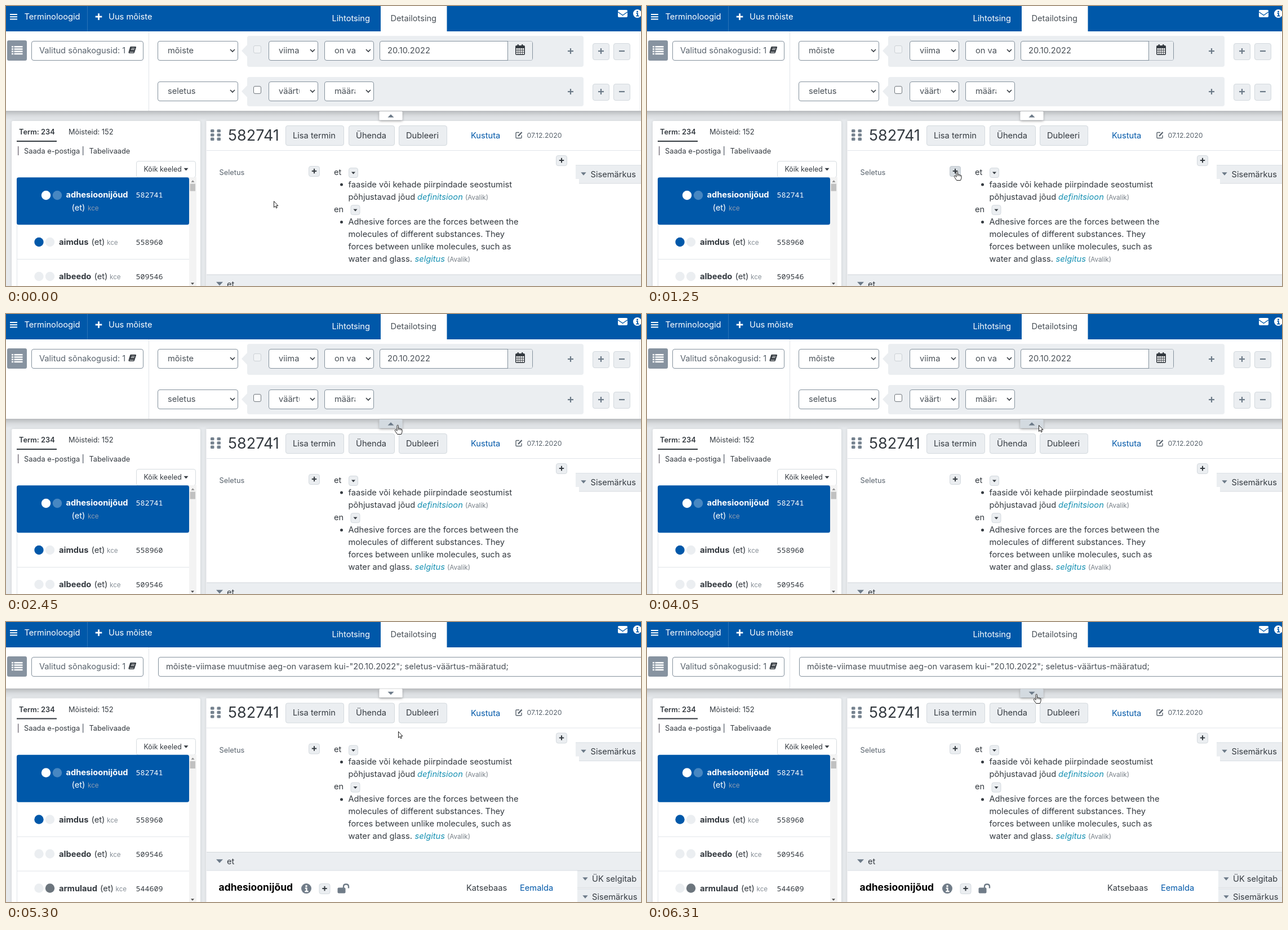
Write an HTML page that moves like this. It is 1127x497 px and loops after 8000 ms.

```html
<!DOCTYPE html>
<html lang="et">
<head>
<meta charset="utf-8">
<title>Detailotsing</title>
<style>
  html, body { margin: 0; width: 100%; height: 100%; overflow: hidden; background: #e6e9ec; }
  svg { display: block; }
  #stage { width: 1127px; height: 497px; }
  text { font-family: Inter, "Open Sans", sans-serif; white-space: pre; }
  text.mono { font-family: "Noto Sans Mono", "DejaVu Sans Mono", monospace; }
</style>
</head>
<body>
<svg id="stage" viewBox="0 0 1127 497">
  <defs>
    <linearGradient id="shade" x2="0" y2="1">
      <stop offset="0" stop-color="#000" stop-opacity=".2"/>
      <stop offset=".5" stop-color="#000" stop-opacity=".06"/>
      <stop offset="1" stop-color="#000" stop-opacity="0"/>
    </linearGradient>
    <filter id="drop" x="-20%" y="-20%" width="140%" height="180%">
      <feDropShadow dx="0" dy="2" stdDeviation="2" flood-opacity=".3"/>
    </filter>
    <filter id="soft" x="-5%" y="-5%" width="110%" height="110%">
      <feDropShadow dx="0" dy="0" stdDeviation="2" flood-opacity=".12"/>
    </filter>
  </defs>
  <g id="page"></g>
  <g id="open"></g>
  <g id="closed"></g>
  <g id="tab"></g>
  <g id="nav"></g>
  <g id="cursor"></g>
</svg>
<script>
const BLUE = '#0058a9', INK = '#343a40', GREY = '#ebeef1', SLATE = '#6c7a88', LINE = '#e1e5e9', ICON = '#707c88';
const LOOP = 8000, LIFT = -68.44;
const $ = id => document.getElementById(id);

const text = (x, y, s, { size = 14.65, fill = INK, weight = 400, style = 'normal', cls = '' } = {}) =>
  `<text x="${x}" y="${y}" class="${cls}" style="font-size:${size}px;fill:${fill};font-weight:${weight};font-style:${style}">${s}</text>`;
const rect = (x, y, w, h, fill, r = 0) =>
  `<rect x="${x}" y="${y}" width="${w}" height="${h}" rx="${r}" fill="${fill}"/>`;
const box = (x, y, w, h, fill = '#fff', stroke = '#84919d', r = 3.5) =>
  `<rect x="${x + .5}" y="${y + .5}" width="${w - 1}" height="${h - 1}" rx="${r}" fill="${fill}" stroke="${stroke}"/>`;
const dot = (x, y, r, fill) => `<circle cx="${x}" cy="${y}" r="${r}" fill="${fill}"/>`;
const line = (d, stroke, w = 1) => `<path d="${d}" fill="none" stroke="${stroke}" stroke-width="${w}"/>`;
const shape = (d, fill) => `<path d="${d}" fill="${fill}"/>`;
const tri = (x, y, w, h, fill = SLATE) => shape(`M${x - w} ${y - h / 2}h${2 * w}l${-w} ${h}z`, fill);
const minus = (x, y, c, r = 5, w = 2.2) => line(`M${x - r} ${y}h${2 * r}`, c, w);
const plus = (x, y, c, r = 5, w = 2.2) => minus(x, y, c, r, w) + line(`M${x} ${y - r}v${2 * r}`, c, w);
const chevron = (x, y) => line(`M${x - 4} ${y - 2}l4 4 4-4`, INK, 1.6);
const button = (x, y, w, h) => box(x, y, w, h, GREY, '#d3d9de');
const info = (x, y, r, fill, ink) => dot(x, y, r, fill) + dot(x, y - r * .48, r * .2, ink) +
  line(`M${x - r * .25} ${y - r * .05}h${r * .3}v${r * .6}m${-r * .35} 0h${r * .7}`, ink, r * .25);
const addButton = (x, y) => button(x, y, 20, 19) + plus(x + 10, y + 9, INK, 4.2, 2);
const dropButton = (x, y) => button(x, y, 17, 18) + tri(x + 8.5, y + 9.5, 3.5, 4, INK);
const select = (x, y, w, label) => box(x, y, w, 35) +
  `<svg x="${x + 18}" y="${y}" width="${w - 51}" height="35">${text(0, 22, label, { fill: '#495057' })}</svg>` +
  chevron(x + w - 10, y + 17);

function searchIcon() {
  let s = rect(2, 61, 35, 36, '#8793a0', 3);
  for (let i = 0; i < 4; i++) {
    const y = 71 + i * 4.2;
    s += rect(10, y, 3, 2.6, '#fff') + rect(14.5, y, 15, 2.6, '#fff');
  }
  return s;
}

function chosenBox(bottom) {
  return rect(0, 44, 1127, bottom - 44, '#fff') + rect(253, 45, 1, bottom - 45, LINE) + searchIcon() +
    box(45, 62, 199, 35) + text(59, 84, 'Valitud sõnakogusid: 1', { fill: '#59636d' }) +
    shape('M221 72h9q1.5 0 1 1.5l-3 9q-.4 1.5-2 1.5h-7q-2 0-1.5-2l2.500-8.500q.3-1.500 1-1.500z', INK) +
    line('M222.500 75h6M221.700 77.500h6M219.500 82h7', '#fff', 1) +
    `<rect y="${bottom}" width="1127" height="17" fill="url(#shade)"/>`;
}

function filterRow(top, y, h, label, a, b, faded) {
  const mid = y + 18;
  return select(269, y, 143, label) + rect(428, top, 597, h, GREY, 4) +
    shape(`M428 ${mid - 11}l-10 10.500 10 10.500z`, GREY) +
    box(439, mid - 10, 14, 14, faded ? '#f1f3f5' : '#fff', faded ? '#cdd2d6' : '#70777d', 2.5) +
    select(466, y, 88, a) + select(565, y, 88, b) + plus(1002, mid, SLATE) +
    button(1041, mid - 14, 30, 30) + plus(1056, mid, SLATE) +
    button(1078, mid - 14, 30, 30) + minus(1093, mid, SLATE);
}

function calendar(x, y) {
  let s = rect(x, y + 2, 17, 17, INK, 2) + rect(x + 3.5, y, 2.5, 5, INK, 1) + rect(x + 11, y, 2.5, 5, INK, 1);
  for (let i = 0; i < 12; i++) s += rect(x + 1.6 + i % 4 * 3.7, y + 7 + (i >> 2) * 3.8, 2.7, 2.8, '#fff');
  return s;
}

function listRow(y, name, after, num, c1, c2) {
  return dot(58.5, y, 8.2, c1) + dot(78, y, 8.2, c2) + text(94, y + 5, name, { weight: 700 }) +
    text(after, y + 5, '(et)') + text(after + 27.5, y + 5, 'kce', { size: 11.7, fill: '#868e96' }) +
    text(230.5, y + 5, num, { cls: 'mono', size: 13.35 }) + rect(19, y + 30, 306, 1, LINE);
}

function leftPanel() {
  const small = { size: 12.8 };
  return `<rect x="10" y="204" width="335" height="500" rx="3" fill="#fff" filter="url(#soft)"/>` +
    text(23, 228, 'Term: 234', { size: 12.8, weight: 600 }) + text(111, 228, 'Mõisteid: 152', small) +
    rect(19, 239, 71, 2, INK) + rect(21, 249, 1.3, 16, '#6b6470') + rect(136, 249, 1.3, 16, '#5c6370') +
    text(32, 261.5, 'Saada e-postiga', small) + text(147.5, 261.5, 'Tabelivaade', small) +
    box(231, 275, 106, 30, '#fff', '#d6dbdf') + text(244.5, 294, 'Kõik keeled', { size: 12.4 }) +
    tri(319.5, 290, 4, 4.5, INK) +
    rect(19, 304, 1, 320, LINE) + rect(325, 304, 13, 320, '#f3f3f3') +
    tri(331.5, 311, 3, -3.5, '#8b8b8b') + rect(326.5, 315.5, 9.5, 13, '#c1c1c1') +
    rect(19, 304.3, 306, 84, BLUE, 3.5) + dot(71, 336, 8.2, '#fff') + dot(91, 336, 8.2, '#4787c2') +
    text(106.5, 340, 'adhesioonijõud', { weight: 700, fill: '#fff' }) + text(116.5, 362.5, '(et)', { fill: '#fff' }) +
    text(145, 362.5, 'kce', { size: 11.7, fill: '#8e9cb0' }) +
    text(230.5, 340, '582741', { cls: 'mono', size: 13.35, fill: '#fff' }) +
    listRow(419, 'aimdus', 151.5, '558960', BLUE, GREY) + listRow(480, 'albeedo', 156.5, '509546', GREY, GREY) +
    listRow(541, 'armulaud', 167, '544609', GREY, '#6c757d');
}

function rightPanel() {
  const tag = { fill: '#1791b3', style: 'italic' }, note = { size: 11.7, fill: '#767e86' }, link = { fill: BLUE };
  let s = `<rect x="355.500" y="204" width="790" height="500" fill="#fff" filter="url(#soft)"/>`;
  for (let i = 0; i < 6; i++) s += rect(363 + i % 2 * 11.5, 219 + (i >> 1) * 7.3, 6.5, 5.3, '#74818e', 1.5);
  s += text(394, 238.5, '582741', { size: 27 });
  for (const [x, w, label] of [[496, 104, 'Lisa termin'], [608, 82, 'Ühenda'], [697, 86, 'Dubleeri']])
    s += button(x, 212, w, 36) + text(x + 13, 234.7, label);
  s += text(825, 235, 'Kustuta', link) +
    line('M911 224.500h-5q-1 0-1 1v8q0 1 1 1h8q1 0 1-1v-4', '#59636d', 1.4) +
    line('M909 231l6.500-7', '#59636d', 2.4) +
    text(924.5, 233.5, '07.12.2020', { size: 12.3, fill: '#59636d' }) + rect(356, 256, 771, 1, LINE) +
    text(378.5, 300, 'Seletus', { size: 12.8, fill: '#59636d' }) + addButton(537, 284) + addButton(976, 265) +
    text(582, 299.7, 'et') + dropButton(608, 287) + text(582, 365.5, 'en') + dropButton(611.5, 353) +
    dot(595.5, 317, 2.5, INK) + dot(595.5, 383.5, 2.5, INK);
  ['faaside või kehade piirpindade seostumist', 'põhjustavad jõud', '', 'Adhesive forces are the forces between the',
    'molecules of different substances. They', 'forces between unlike molecules, such as', 'water and glass.']
    .forEach((t, i) => s += text(607.5, 321.7 + i * 22, t));
  s += text(730, 343.7, 'definitsioon', tag) + text(815, 343.7, '(Avalik)', note) +
    text(725.5, 453.7, 'selgitus', tag) + text(783, 453.7, '(Avalik)', note) +
    rect(1011, 282, 8, 25, GREY) + rect(1017, 282, 110, 33, GREY) + rect(1011, 282, 116, 1, '#dde2e6') +
    rect(1017, 314.5, 110, 1, '#d9dee2') + tri(1025, 298, 4.7, 5.5) + text(1037.5, 303.7, 'Sisemärkus') +
    rect(356, 476.5, 771, 33, GREY) + rect(356, 476.5, 771, 1, '#d3d9dd') + rect(356, 509, 771, 1, '#d9dee2') +
    tri(379, 493, 6, 6.5) + text(392, 498.5, 'et') +
    text(377.5, 545.5, 'adhesioonijõud', { size: 17.5, weight: 700, fill: '#000' }) +
    info(533, 541.5, 9, ICON, '#fff') + addButton(555.5, 532.5) +
    rect(588.5, 540, 14, 10, ICON, 2) + line('M599 541v-3q0-4 4.500-4t4.500 4v3', ICON, 2.4) +
    text(817, 545.5, 'Katsebaas') + text(912, 545.5, 'Eemalda', link);
  [['ÜK selgitab', 509.5], ['Sisemärkus', 541.5]].forEach(([t, y]) =>
    s += rect(1014, y, 113, 31, GREY) + rect(1014, y, 113, 1, '#d6dbe0') + rect(1014, y + 30, 113, 1, '#d6dbe0') +
      tri(1028, y + 15, 4.7, 5.5) + text(1040, y + 20.3, t));
  return s;
}

function build() {
  const white = { fill: '#fff' };
  $('page').innerHTML = rect(0, 0, 1127, 700, '#e6e9ec') +
    `<g id="low">${leftPanel()}${rightPanel()}<g id="addHover">${box(537, 284, 20, 19, '#d5dbe0', '#c3cad1')}${plus(547, 293, INK, 4.2, 2)}</g></g>` +
    rect(325, 486, 13, 11, '#f3f3f3') + tri(331, 493, 3, 3.5, '#505050');
  $('open').innerHTML = chosenBox(186) + rect(1124, 45, 1, 141, '#eef0f2') +
    filterRow(53, 62, 55, 'mõiste', 'viima', 'on va', true) +
    filterRow(126, 134, 52, 'seletus', 'väärtu', 'määra', false) +
    box(663, 62, 272, 35) + shape('M891 62.500h40q3 0 3 3v28q0 3-3 3h-40z', GREY) + rect(890, 62, 1, 35, '#84919d') +
    text(677, 84, '20.10.2022', { fill: '#495057' }) + calendar(904, 68);
  $('closed').innerHTML = chosenBox(118) + box(270, 62, 900, 35) +
    text(284, 84, 'mõiste-viimase muutmise aeg-on varasem kui-"20.10.2022"; seletus-väärtus-määratud;', { fill: '#495057' });
  $('tab').innerHTML = `<rect id="tabBox" x="662.500" y="187" width="41" height="15.500" rx="1.500" filter="url(#drop)"/>` +
    `<g id="up">${tri(683, 195, 5.5, -5.5)}</g><g id="down">${tri(683, 195, 5.5, 5.5)}</g>`;
  let nav = rect(0, 0, 1127, 45, BLUE) + rect(144, 0, 1, 45, '#2a73b8') + rect(665, 0, 117.5, 45, '#fff');
  for (const y of [14, 18.2, 22.4]) nav += rect(7, y, 13, 2, '#fff');
  $('nav').innerHTML = nav + text(32.5, 24.3, 'Terminoloogid', white) + plus(164.5, 19, '#fff', 5.8, 2.8) +
    text(182, 24.3, 'Uus mõiste', white) + text(578.5, 27, 'Lihtotsing', white) +
    text(682.5, 27, 'Detailotsing', { fill: '#495057' }) + rect(1086, 7, 17, 13, '#fff', 2) +
    line('M1086 10.500l8.500 6 8.500-6', BLUE, 1.4) + info(1120.5, 13.5, 7.5, '#fff', BLUE);
  const pen = 'fill="#fff" stroke="#222" stroke-linejoin="round"';
  $('cursor').innerHTML =
    `<path id="arrow" ${pen} d="M.5 .5v11l2.500-2.300 1.600 3.600 1.700-.8-1.600-3.500h3.200z"/>` +
    `<g id="hand"><path ${pen} d="M-1 9V1.500q0-1.300 1.200-1.300t1.200 1.300V6q2.200-1 2.400.7 2-.8 2.200.8 2-.4 2 1.400v3.600l-1.500 4H-.5L-4.500 10.500q-.8-1.600.5-2.200 1.200-.3 3 2.200z"/>` +
    `${line('M1.400 6v3M3.800 7v2.200M6 7.800v1.800', '#222', .9)}</g>` +
    `<circle id="click" r="8" fill="#ff0" fill-opacity=".47"/>`;
}

// Pointer path: time, x, y
const PATH = [
  [0, 475, 346], [655, 475, 346], [1250, 549.5, 293], [1520, 593, 265], [2330, 694, 197], [2390, 695, 197],
  [5235, 695, 197], [5300, 696, 194], [6040, 695, 138], [6110, 693, 133], [6310, 691, 128], [LOOP, 691, 128]
];

// The pointer is sampled about fifteen times a second
function pointer(t) {
  const start = t < 5300 ? 720 : 5300;
  if (t >= 720) t = start + Math.floor((t - start) / 66.25) * 66.25;
  const i = PATH.findIndex(p => p[0] > t), [t0, x0, y0] = PATH[i - 1], [t1, x1, y1] = PATH[i];
  const k = (t - t0) / (t1 - t0);
  return [x0 + (x1 - x0) * k, y0 + (y1 - y0) * k];
}

const show = (id, on) => $(id).setAttribute('display', on ? 'inline' : 'none');

function render(t) {
  const closed = t >= 4180, within = (a, b) => t >= a && t < b;
  const [x, y] = pointer(t);
  const onAdd = t < 1520 && x > 537 && x < 557 && y < 303;
  const onTab = within(2390, 4240) || t >= 6110;
  const hand = onAdd || within(2390, 4050) || t >= 6110;
  const lift = `translate(0 ${closed ? LIFT : 0})`;
  show('open', !closed);
  show('closed', closed);
  show('up', !closed);
  show('down', closed);
  show('addHover', onAdd);
  show('hand', hand);
  show('arrow', !hand);
  show('click', within(3450, 4050));
  $('low').setAttribute('transform', lift);
  $('tab').setAttribute('transform', lift);
  $('tabBox').setAttribute('fill', onTab ? '#d3dae0' : '#fff');
  $('cursor').setAttribute('transform', `translate(${Math.round(x)} ${Math.round(y)})`);
}

build();
const began = performance.now();
(function tick() {
  render((performance.now() - began) % LOOP);
  requestAnimationFrame(tick);
})();
</script>
</body>
</html>
```
